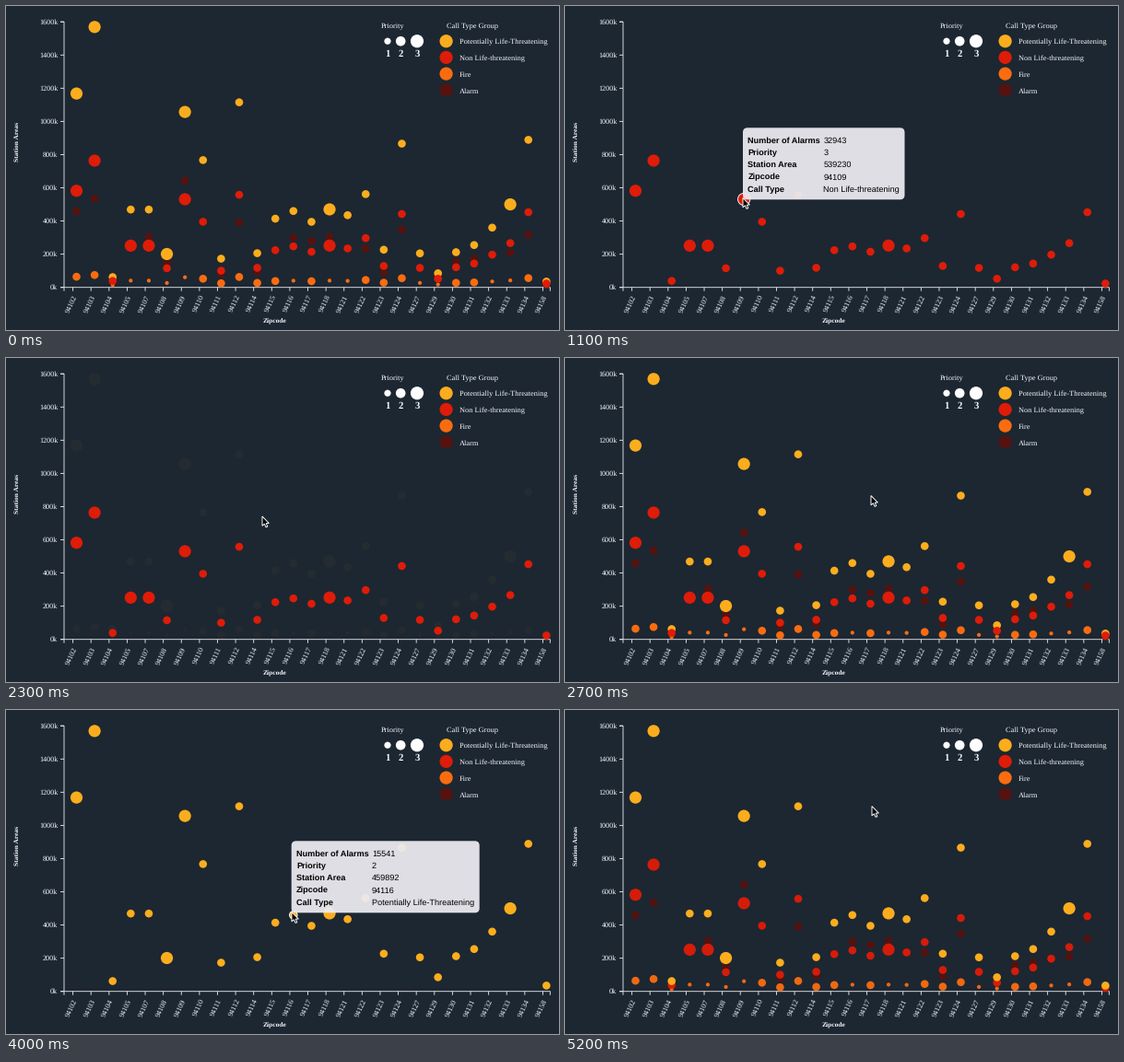
These frames come from a looping animation (600x352 px, 5300 ms). A matplotlib script:

```python
import matplotlib.pyplot as plt
import numpy as np
from matplotlib.animation import FuncAnimation
from matplotlib.patches import Circle, FancyBboxPatch, Polygon

plt.rcParams["text.hinting"] = "none"

W, H, DPI = 600, 352, 100
PX = 72 / DPI
STEP_MS, LOOP_MS, FADE_MS = 100, 5300, 500
BG, INK = "#1c2732", "#f6f7f8"
COLORS = {"alarm": "#55130f", "fire": "#fb6c10",
          "minor": "#de1c08", "severe": "#fcad1d"}
SERIF, SANS = "Liberation Serif", "Liberation Sans"
TOP, BASE, LEFT, RIGHT = 17.2, 305.7, 63, 590.4
SMALL, MID, BIG = 2.1, 4.3, 6.6

ZIPS = ("02 03 04 05 07 08 09 10 11 12 14 15 16 17 18 21 22 23 24 27 "
        "29 30 31 32 33 34 58").split()
IDX = np.arange(len(ZIPS))
XS = 76.5 + 19.61 * IDX

# Most serious calls in thousands; the other types follow from them
SEVERE = np.array([1168, 1569, 62, 469, 469, 201, 1057, 767, 173, 1115, 206,
                   414, 460, 395, 470, 435, 562, 227, 866, 205, 85, 212, 255,
                   360, 500, 889, 35])
MINOR = 0.877 * SEVERE ** 0.92
VALUES = {
    "alarm": MINOR * (1 - 0.3 * np.cos(np.pi * (IDX - 1) / 4)),
    "fire": 1.88 * np.sqrt(SEVERE),
    "minor": MINOR,
    "severe": SEVERE,
}
# Dots whose radius is not the middle one
ODD_SIZE = {
    "alarm": ([], MID),
    "fire": ([2, 3, 4, 5, 6, 12, 14, 15, 19, 20, 23, 24, 26], SMALL),
    "minor": ([0, 1, 3, 4, 6, 14], BIG),
    "severe": ([0, 1, 5, 6, 14, 24], BIG),
}

fig = plt.figure(figsize=(W / DPI, H / DPI), dpi=DPI, facecolor=BG)
ax = fig.add_axes([0, 0, 1, 1])
ax.set_xlim(0, W)
ax.set_ylim(H, 0)
ax.axis("off")


def y_of(thousands):
    return BASE - thousands * (BASE - TOP) / 1600


def label(x, y, s, size, font=SERIF, color=INK, **kw):
    return ax.text(x, y, s, fontsize=size * PX, family=font, color=color,
                   va="baseline", **kw)


def line(xs, ys):
    ax.plot(xs, ys, color="#e6e8ea", lw=0.9 * PX, zorder=1, snap=False,
            solid_capstyle="butt", solid_joinstyle="miter")


def disc(x, y, r, color):
    ax.add_patch(Circle((x, y), r, fc=color, lw=0))


def draw_axes():
    line([LEFT - 4, LEFT, LEFT, LEFT - 4], [TOP, TOP, BASE, BASE])
    line([LEFT, LEFT, RIGHT, RIGHT], [BASE + 4, BASE, BASE, BASE + 4])
    for k in range(0, 1601, 200):
        y = y_of(k)
        line([LEFT - 4, LEFT], [y, y])
        label(LEFT - 6.8, y + 2.7, f"{k}k", 8.2, ha="right")
    for x, z in zip(XS - 3.9, ZIPS):
        line([x, x], [BASE, BASE + 4])
        label(x + 4.9, BASE + 9.4, "941" + z, 8.2, ha="right", rotation=65,
              rotation_mode="anchor")
    label(292, 344.3, "Zipcode", 7.5, ha="center", weight="bold")
    label(14.2, 147.5, "Station Areas", 7.5, ha="center", weight="bold",
          rotation=90, rotation_mode="anchor")


def draw_legend():
    label(407, 24, "Priority", 8.4)
    for n, x, r in ((1, 414, 3.6), (2, 428.2, 5.3), (3, 446, 7.1)):
        disc(x, 38.2, r, "white")
        label(x, 55.3, str(n), 10.8, ha="center", weight="bold")
    label(477.7, 24, "Call Type Group", 8.4)
    names = (("severe", "Potentially Life-Threatening"),
             ("minor", "Non Life-threatening"),
             ("fire", "Fire"), ("alarm", "Alarm"))
    for i, (kind, name) in enumerate(names):
        y = 38.2 + 17.7 * i
        disc(477.6, y, 7.1, COLORS[kind])
        label(491.5, y + 3.2, name, 8.4)


def radii(kind):
    odd, r = ODD_SIZE[kind]
    return np.where(np.isin(IDX, odd), r, MID)


def make_dots(kind):
    area = (2 * radii(kind) * PX) ** 2
    return ax.scatter(XS, y_of(VALUES[kind]), s=area, c=COLORS[kind],
                      linewidths=0)


def make_tip(x, y, w, kind, i, rows):
    box = FancyBboxPatch((x, y), w, 78, fc="#edebf0", lw=0, alpha=0.94,
                         boxstyle="round,pad=0,rounding_size=5", zorder=8)
    ring = Circle((XS[i], y_of(VALUES[kind][i])), radii(kind)[i], fc="none",
                  ec="white", lw=0.9 * PX, zorder=7)
    parts = [ax.add_patch(box), ax.add_patch(ring)]
    heads = ("Number of Alarms", "Priority", "Station Area", "Zipcode",
             "Call Type")
    for n, (head, value) in enumerate(zip(heads, rows)):
        base = y + 16.2 + 13.35 * n
        parts.append(label(x + 5.4, base, head, 9.2, SANS, "black",
                           weight="bold", zorder=9))
        parts.append(label(x + 87.2, base, value, 9.2, SANS, "black",
                           zorder=9))
    return parts


draw_axes()
draw_legend()
dots = {kind: make_dots(kind) for kind in COLORS}

# (start, end, kept call type, tooltip)
HOVERS = (
    (590, 2190, "minor",
     make_tip(193, 132.3, 175.5, "minor", 6,
              ("32943", "3", "539230", "94109", "Non Life-threatening"))),
    (3265, 4810, "severe",
     make_tip(309.7, 142.3, 204, "severe", 12,
              ("15541", "2", "459892", "94116",
               "Potentially Life-Threatening"))),
)

ARROW = 0.92 * np.array([(0, 0), (0, 11.2), (2.6, 8.9), (4.4, 12.9),
                         (6.3, 12.1), (4.6, 8.2), (8, 8.2)])
cursor = ax.add_patch(Polygon(ARROW, fc="black", ec="white", lw=0.95 * PX,
                              zorder=12))
# Time and pointer position at each stop
STOPS = np.array([(100, 300, 52), (600, 193, 208.5), (2100, 193, 208.5),
                  (2300, 278, 172), (2700, 332, 149.5), (3300, 310, 219.5),
                  (4800, 310, 219.5), (5200, 333, 104.5)])


def ease(u):
    u = np.clip(u, 0, 1)
    return 4 * u ** 3 if u < 0.5 else 1 - 4 * (1 - u) ** 3


def update(n):
    t = n * STEP_MS
    alpha = dict.fromkeys(dots, 1.0)
    for start, end, kept, tip in HOVERS:
        dim = ease((t - start) / FADE_MS) - ease((t - end) / FADE_MS)
        for kind in dots:
            if kind != kept:
                alpha[kind] *= 1 - dim
        for part in tip:
            part.set_visible(start <= t < end)
    # The last hovered call type stays on top
    raised = "minor" if t < HOVERS[1][0] else "severe"
    for z, (kind, group) in enumerate(dots.items()):
        group.set_alpha(alpha[kind])
        group.set_zorder(6 if kind == raised else 2 + z)
    x, y = (np.interp(t, STOPS[:, 0], STOPS[:, k]) for k in (1, 2))
    cursor.set_xy(ARROW + (x, y))
    cursor.set_visible(t >= STOPS[0, 0])
    return [cursor, *dots.values()]


anim = FuncAnimation(fig, update, frames=LOOP_MS // STEP_MS,
                     interval=STEP_MS, repeat=True, repeat_delay=0, blit=False)
plt.show()
```
